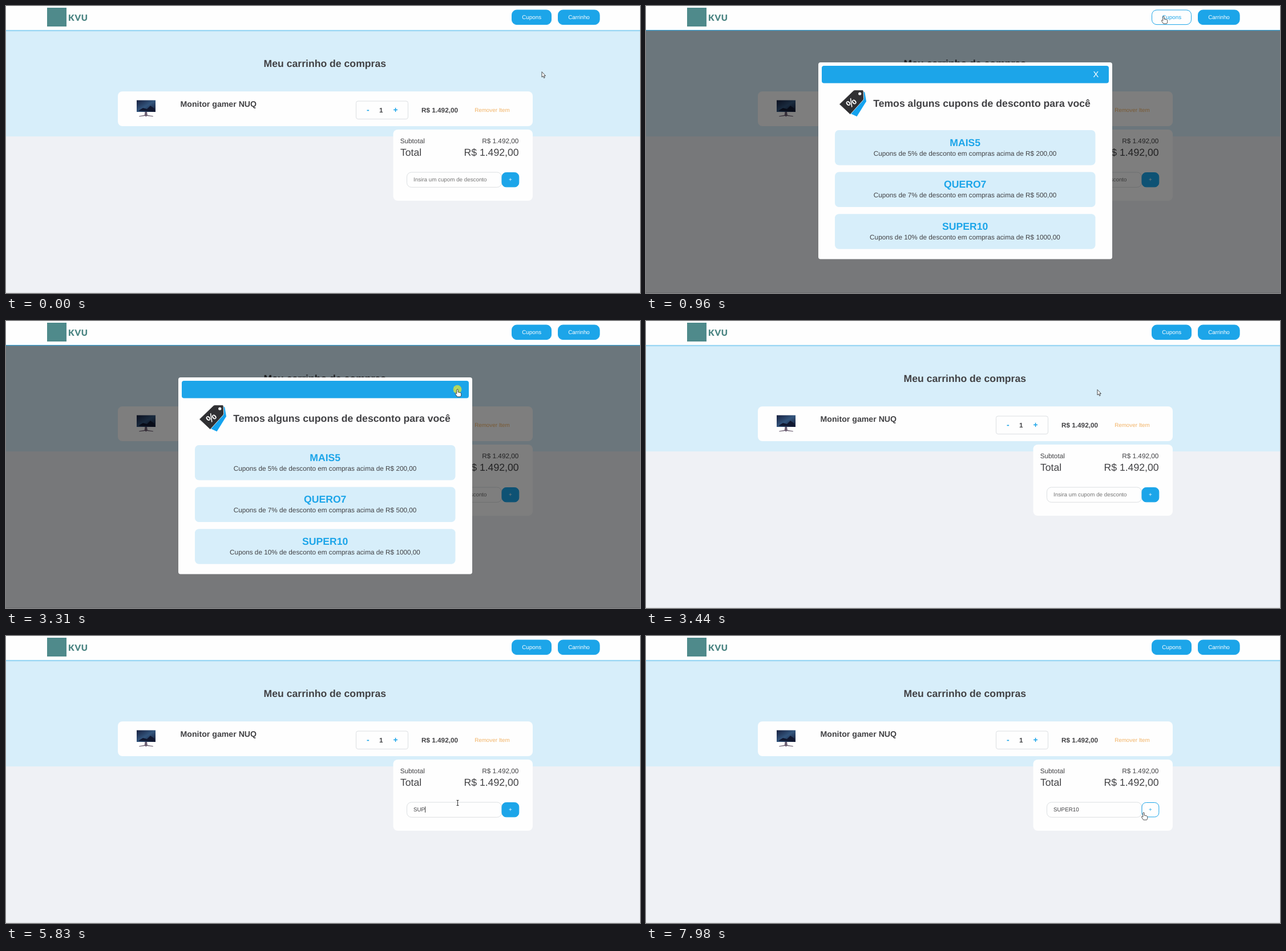
Recreate the animation shown at these times as an HTML page. Size 1111 px wide and 504 px high, loop 8 s.

```html
<!DOCTYPE html>
<html lang="pt-BR">
<head>
<meta charset="utf-8">
<title>Carrinho de compras</title>
<style>
  html, body { margin: 0; width: 100%; height: 100%; overflow: hidden; background: #eff1f5; }
  svg { display: block; width: 1111px; height: 504px; }
  text { font: 11.76px "Liberation Sans", Arial, sans-serif; fill: #424245; text-rendering: geometricPrecision; white-space: pre; }
  .b { font-weight: bold; }
  .big { font-size: 17.64px; }
  .small { font-size: 9.8px; }
  .mid { text-anchor: middle; }
  .end { text-anchor: end; }
  .blue { fill: #1ca5e9; }
  .white { fill: #fefefe; }
  .pale { fill: #d7eefa; }
  .btn rect { fill: #1ca5e9; stroke: #1ca5e9; }
  .btn text { fill: #fff; }
  .btn.hover rect { fill: #fefefe; }
  .btn.hover text { fill: #1ca5e9; }
  .box { fill: #fefefe; stroke: #dcdfe2; }
  #cursor path { fill: #fff; stroke: #222; stroke-width: .8; stroke-linejoin: round; }
  #cursor #beam { fill: none; stroke: #333; stroke-width: 1; }
</style>
</head>
<body>
<svg viewBox="0 0 1111 504">
  <defs>
    <linearGradient id="screen" x2="1" y2="1">
      <stop offset="0" stop-color="#17203f"/>
      <stop offset=".5" stop-color="#33557d"/>
      <stop offset="1" stop-color="#141a33"/>
    </linearGradient>
  </defs>

  <!-- page -->
  <rect width="1111" height="504" fill="#eff1f5"/>
  <rect y="43" width="1111" height="186" class="pale"/>
  <rect y="503" width="1111" height="1" fill="#dcdee1"/>
  <text x="558.8" y="107" class="b big mid">Meu carrinho de compras</text>

  <rect x="196" y="150" width="727" height="61" rx="8" class="white"/>
  <rect x="229" y="165.5" width="33" height="20.5" fill="url(#screen)"/>
  <path d="M232 184l8-5 7 2 6-6 7 5v5z" fill="#111830"/>
  <path d="M243.500 186h3.500l.8 5.500 10 1.800v.9l-11-1.200-1.500 1.600-1.500-1.600-10.500 1.200v-.9l9.500-1.800z" fill="#6d5f72"/>
  <text x="305.500" y="177" class="b" style="font-size:14.150px">Monitor gamer NUQ</text>
  <rect x="613.5" y="167" width="91" height="31.500" rx="3.500" class="box"/>
  <text x="634.300" y="187" class="b mid blue" style="font-size:14px">-</text>
  <text x="657.200" y="186.500" class="b mid">1</text>
  <text x="682.700" y="187.200" class="b mid blue" style="font-size:14px">+</text>
  <text x="728" y="186.500" class="b">R$ 1.492,00</text>
  <text x="821.200" y="185.600" class="small" style="fill:#f2b366">Remover Item</text>

  <rect x="678.500" y="217" width="244.500" height="125" rx="8" class="white"/>
  <text x="690.700" y="241.200">Subtotal</text>
  <text x="898.300" y="241.200" class="end">R$ 1.492,00</text>
  <text x="691" y="262.700" class="big">Total</text>
  <text x="898.500" y="262.700" class="big end">R$ 1.492,00</text>
  <rect x="702.500" y="292" width="166" height="26.300" rx="8" class="box"/>
  <text id="field" x="714" y="308" class="small"></text>
  <rect id="caret" y="299.500" width="1" height="10.500" fill="#333"/>
  <g id="add" class="btn">
    <rect x="869" y="292.500" width="29.800" height="25.300" rx="7.500"/>
    <text x="883.800" y="308" class="small mid">+</text>
  </g>

  <!-- coupon dialog -->
  <g id="modal">
    <rect y="43" width="1111" height="461" opacity=".5"/>
    <rect x="302" y="99" width="515" height="345.500" rx="4" class="white"/>
    <rect x="308" y="105" width="503" height="30.500" rx="4" class="blue"/>
    <text id="close" x="788.400" y="125" class="mid" style="font-size:14.700px;fill:#fff">X</text>
    <path d="M381 150l2.300 1.500 2.700 16-16.500 26.500-13-6z" fill="#14a3ef"/>
    <path d="M338.700 172.500L363 149q1.500-1.400 3.500-1.400h12.800q1.700 0 1.700 1.700l.6 13q0 2-1.400 3.400l-22.400 24.800z" fill="#303033" stroke="#fefefe" stroke-width=".8"/>
    <circle cx="374.700" cy="154" r="2.600" class="white"/>
    <text class="b mid" transform="translate(364 174.500) rotate(-42)" style="font-size:19px;fill:#fff">%</text>
    <text x="398.200" y="177" class="b big">Temos alguns cupons de desconto para você</text>
    <g id="coupons"></g>
  </g>

  <!-- top bar -->
  <rect width="1111" height="42" class="white"/>
  <rect id="line" y="42" width="1111"/>
  <rect x="72" y="3" width="34" height="33" fill="#4f8a8b"/>
  <text x="109" y="26" style="font:900 15px Lato,sans-serif;fill:#4b8583;letter-spacing:.8px">KVU</text>
  <g id="list" class="btn">
    <rect x="886.500" y="7" width="69" height="25.600" rx="8.500"/>
    <text x="921.200" y="23" class="small mid">Cupons</text>
  </g>
  <g class="btn">
    <rect x="967.500" y="7" width="72.600" height="25.600" rx="8.500"/>
    <text x="1004" y="23" class="small mid">Carrinho</text>
  </g>

  <g id="cursor">
    <circle id="click" r="7.400" fill="#ffee14" opacity=".65"/>
    <path id="arrow" d="M0 .5V10L2.200 8.100 3.700 11.500 5.200 10.800 3.800 7.600H6.500z"/>
    <path id="hand" d="M-1.200 1.200a1.200 1.200 0 0 1 2.400 0V5l4 .8q1.500.4 1.500 2V9.500q0 2-1.200 3.500H-.3L-3.400 8.500q-.8-1.500.6-1.900l1.600 1.300z"/>
    <path id="beam" d="M-2-4.500H2M0-4.500V4.500M-2 4.500H2"/>
  </g>
</svg>
<script>
const LOOP = 8000, STEP = 70;
const $ = id => document.getElementById(id);
const show = (id, on) => $(id).style.display = on ? '' : 'none';

const coupons = [['MAIS5', 5, 200], ['QUERO7', 7, 500], ['SUPER10', 10, 1000]];
$('coupons').innerHTML = coupons.map(([code, percent, min], i) => `
  <g transform="translate(0 ${73.6 * i})">
    <rect x="331" y="218" width="456.500" height="61.500" rx="7" class="pale"/>
    <text x="559.200" y="245.500" class="b big mid blue">${code}</text>
    <text x="559" y="262.700" class="mid">Cupons de ${percent}% de desconto em compras acima de R$ ${min},00</text>
  </g>`).join('');

// Cursor moves: start time, number of steps, Bezier points
const moves = [
  [70, 7, [[939, 115], [936, 85], [915, 45], [907, 18]]],
  [1420, 12, [[907, 18], [880, 90], [775, 260], [759, 347]]],
  [2260, 12, [[759, 347], [762, 372], [868, 290], [792, 125]]],
  [3100, 2, [[792, 125], [792, 123], [791, 121], [791, 120]]],
  [3500, 6, [[791, 120], [790, 190], [787, 265], [786, 318]]],
  [3920, 8, [[786, 318], [785, 323], [787, 305], [788, 297]]],
  [4840, 1, [[788, 297], [789, 296], [790, 294], [791.5, 293]]],
  [7700, 5, [[791.5, 293], [815, 278], [850, 288], [872, 310]]]
];
const clicks = [[820, 960], [3310, 3440], [4710, 4840]];
const typed = [5440, 5570, 5830, 6360, 6560, 7090, 7240];

const ease = p => (1 - Math.cos(Math.PI * p)) / 2;
const bezier = ([a, b, c, d], p) => [0, 1].map(i => {
  const q = 1 - p;
  return q * q * q * a[i] + 3 * q * q * p * b[i] + 3 * q * p * p * c[i] + p * p * p * d[i];
});

function cursorAt(t) {
  const move = moves.filter(m => t >= m[0]).pop();
  if (!move) return moves[0][2][0];
  const [start, steps, points] = move;
  return bezier(points, ease(Math.min(1, (Math.floor((t - start) / STEP) + 1) / steps)));
}

function draw(t) {
  const [x, y] = cursorAt(t);
  const within = (l, top, r, b) => x >= l && x <= r && y >= top && y <= b;
  const open = t >= 960 && t < 3440;
  const onList = within(886, 6, 956, 33);
  const onClose = open && within(781, 112, 797, 128);
  const onAdd = !open && within(868.5, 292, 899, 318);
  const onField = !open && within(702, 286, 868, 318);
  const hand = onList || onClose || onAdd;

  show('modal', open);
  $('line').setAttribute('height', open ? 1.4 : 2.4);
  $('line').setAttribute('fill', open ? '#3d9cc9' : '#9cd7f4');
  $('list').classList.toggle('hover', onList);
  $('add').classList.toggle('hover', onAdd);
  $('close').style.opacity = onClose ? .25 : 1;

  const count = typed.filter(k => t >= k).length;
  const field = $('field');
  field.textContent = count ? 'SUPER10'.slice(0, count) : 'Insira um cupom de desconto';
  field.style.fill = count ? '#424245' : '#757575';
  show('caret', (t >= 4710 && t < 5110) || (t >= 5440 && t < 7700));
  $('caret').setAttribute('x', 714 + (count ? field.getComputedTextLength() : 0));

  $('cursor').setAttribute('transform', `translate(${x} ${y})`);
  show('click', clicks.some(([from, to]) => t >= from && t < to));
  show('hand', hand);
  show('beam', onField);
  show('arrow', !hand && !onField);
}

const began = performance.now();
function frame() {
  draw((performance.now() - began) % LOOP);
  requestAnimationFrame(frame);
}
frame();
</script>
</body>
</html>
```
